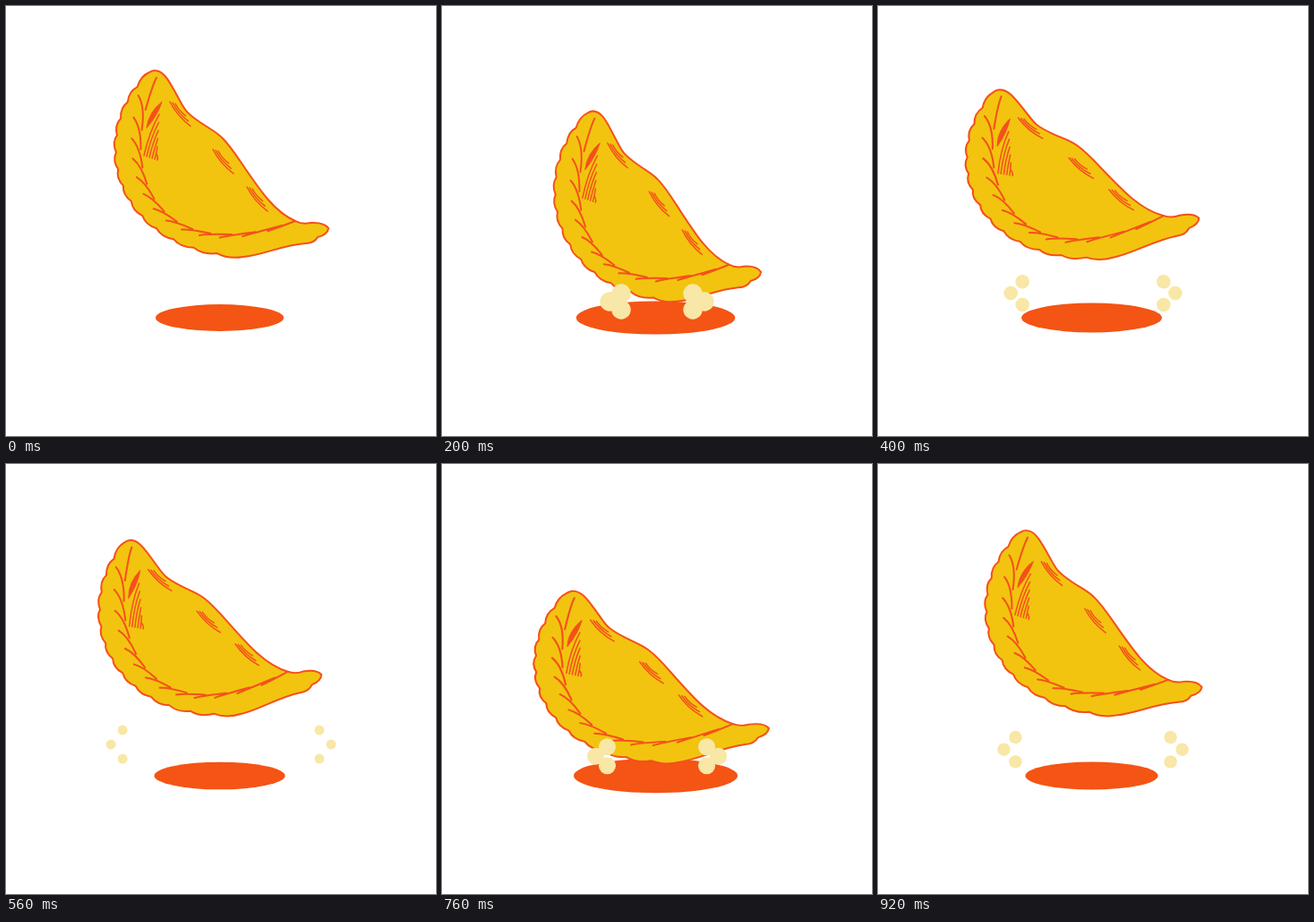
An HTML page that plays this animation: 480x480 px, repeating every 0.96 s.

```html
<!DOCTYPE html>
<html lang="en">
<head>
<meta charset="utf-8">
<title>Bouncing empanada</title>
<style>
  html, body { margin: 0; width: 100%; height: 100%; overflow: hidden; background: #fff; }
  svg { display: block; width: 100%; height: 100%; }
  #body path { fill: none; stroke: #f4511a; stroke-width: 2; stroke-linecap: round; stroke-linejoin: round; }
  #body #dough { fill: #f2c40f; }
  #body #mark { fill: #f4511a; stroke-width: 1; }
  #body #hatches { stroke-width: 1.5; }
</style>
</head>
<body>
<svg viewBox="0 0 480 480">
  <ellipse id="shadow" cx="238.5" cy="348" fill="#f45414"/>
  <g id="body">
    <path id="dough"/>
    <path id="crimps"/>
    <path id="mark" d="M174 107 Q169 122 157 136 Q159 119 174 107 Z"/>
    <path id="hatches"/>
  </g>
  <g id="dust" fill="#f8e7a6"></g>
</svg>
<script>
const LOOP = 960, BOUNCE = 480, STEP = 40;
const DUST_START = 200, DUST_LIFE = 400;
const SCALLOPS = 14, CRIMPS = 14;

const $ = id => document.getElementById(id);
const setAttrs = (el, attrs) => Object.entries(attrs).forEach(([k, v]) => el.setAttribute(k, v));
const repeat = (n, fn) => Array.from({ length: n }, (_, i) => fn(i)).join(" ");
const smooth = x => (x = Math.min(1, Math.max(0, x)), x * x * (3 - 2 * x));

// Soft bump with a flat top of 2 * hold ms
const bell = (t, mid, hold, width) => Math.exp(-((Math.max(0, Math.abs(t - mid) - hold) / width) ** 2));

// Point on a cubic curve, moved sideways by offset
function along([a, b, c, d], t, offset = 0) {
  const u = 1 - t;
  const at = i => u * u * u * a[i] + 3 * u * u * t * b[i] + 3 * u * t * t * c[i] + t * t * t * d[i];
  const slope = i => u * u * (b[i] - a[i]) + 2 * u * t * (c[i] - b[i]) + t * t * (d[i] - c[i]);
  const k = offset / Math.hypot(slope(0), slope(1));
  return [at(0) - k * slope(1), at(1) + k * slope(0)];
}

function drawBody() {
  const rim = [[160, 74], [86, 143], [119, 275], [265, 280]];
  const ridge = [[168, 80], [120, 190], [170, 295], [323, 240]];

  const scallops = repeat(SCALLOPS, i =>
    `Q${along(rim, (i + .45) / SCALLOPS, 4)} ${along(rim, (i + 1) / SCALLOPS, i < SCALLOPS - 1 ? -1 : 0)}`);
  $("dough").setAttribute("d", `M160 74 ${scallops}
    C287 278 308 267 334 265 Q344 265 348 258 Q359 255 360 248 Q355 241 340 242 Q331 244 323 240
    C300 230 285 208 262 174 S236 143 217 130 S199 114 191 100 S177 72 166 72 Q163 72 160 74 Z`);

  $("crimps").setAttribute("d", repeat(CRIMPS, i => {
    const t = i / CRIMPS;
    const start = along(ridge, t, i && 13 - 12 * t);
    return `M${start} Q${along(ridge, t + .03, 1)} ${along(ridge, Math.min(1, t + .11))}`;
  }));

  const topHatches = [[183, 107], [231, 160], [269, 202]].map(([x, y]) => repeat(3, i => {
    const size = 1 - .25 * i;
    return `M${x + 3 * i} ${y + i} q${8 * size} ${16 * size} ${23 * size} ${27 * size}`;
  })).join(" ");
  const sideHatches = repeat(6, i =>
    `M${171 - i / 2} ${121 + 9 * i} Q${160 + 2 * i} ${140 + 6 * i} ${154 + 3 * i} ${167 + i}`);
  $("hatches").setAttribute("d", topHatches + sideHatches);
}

const dots = [-1, 1].flatMap(side => [-1, 0, 1].map(row => {
  const el = document.createElementNS("http://www.w3.org/2000/svg", "circle");
  $("dust").append(el);
  return { el, side, row };
}));

function drawDust(t) {
  // The first burst lives on into the second bounce
  const age = t < DUST_START ? -1 : (t - DUST_START) % BOUNCE;
  const visible = age >= 0 && age < DUST_LIFE;
  $("dust").setAttribute("visibility", visible ? "visible" : "hidden");
  for (const { el, side, row } of dots) {
    setAttrs(el, {
      cx: 240 + side * (53 - 13 * Math.abs(row) + .194 * age),
      cy: 330 - .047 * age + row * (9 + .0195 * age),
      r: Math.max(0, 10.7 - .0145 * age)
    });
  }
}

function draw(now) {
  const t = Math.floor(now % LOOP / STEP + .01) * STEP % LOOP;
  const phase = t % BOUNCE;
  const y = 300 + 57 * bell(phase, 245, 15, 82);
  const squash = .115 * bell(phase, 330, 5, 70) - .04 * bell(phase, 185, 0, 60);
  const tilt = -7.4 * (smooth((t - 220) / 130) - smooth((t - 700) / 130));
  $("body").setAttribute("transform",
    `translate(240 ${y}) rotate(${tilt}) scale(${1 + squash} ${1 - .6 * squash}) translate(-240 -300)`);

  const rx = 71.5 + 20 * bell(phase, 268, 30, 99);
  setAttrs($("shadow"), { rx, ry: rx / 4.77 });
  drawDust(t);
  requestAnimationFrame(draw);
}

drawBody();
draw(performance.now());
</script>
</body>
</html>
```
